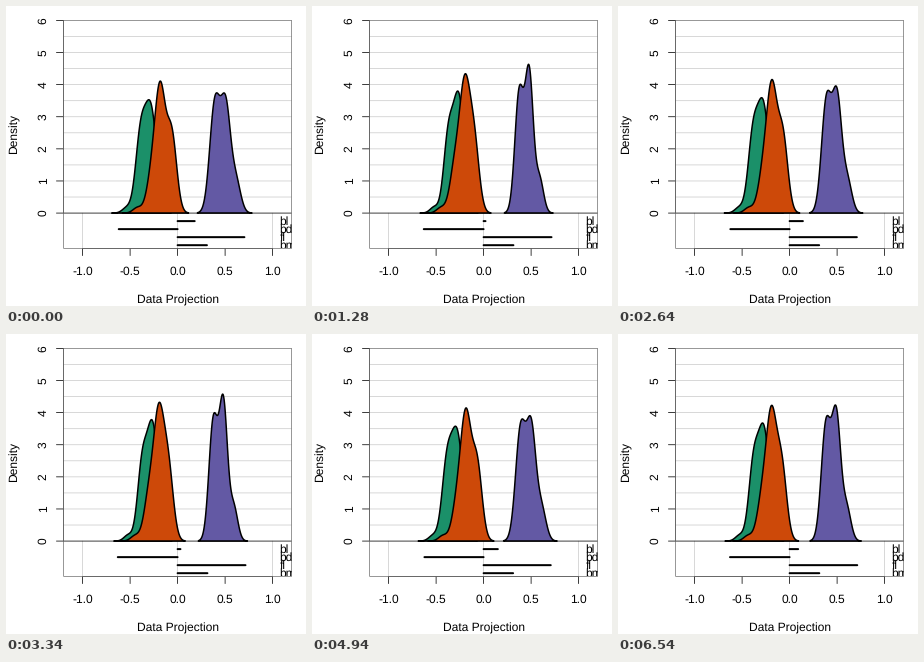
Recreate the animation shown at these times as a matplotlib script. Size 300 px wide and 300 px high, loop 6.56 s.

```python
import numpy as np
import matplotlib.pyplot as plt
from matplotlib.animation import FuncAnimation
from matplotlib.collections import LineCollection
from matplotlib.patches import Polygon, Rectangle

plt.rcParams.update({
    "font.family": "Liberation Sans", "font.size": 12,
    "path.snap": False, "text.hinting": "none",
})

SIZE, LOOP, TICK = 300, 6560, 20
L, R, T, B = 57.6, 285.6, 14.4, 242.4
REACH = 18                              # steps from rest to the widest rotation
MAX_SIN = 0.18                          # share of "bl" at the widest rotation
BEATS = np.cumsum([0, 100, 20, 100, 20, 100, 20])   # one 460 ms bar of uneven steps

# Each hill: colour, growth of its widths over the rotation, and its bumps as
# (centre, height, width, centre drift, height drift)
HILLS = [
    ("#1b9069", 0.07, [(-0.517, 0.19, 0.044, -0.016, -0.02),
                       (-0.371, 2.18, 0.049, -0.022, -0.03),
                       (-0.259, 3.64, 0.059, -0.023, -0.43)]),
    ("#cd4909", 0.0, [(-0.450, 0.17, 0.047, 0.028, 0.0),
                      (-0.306, 1.43, 0.053, 0.031, -0.43),
                      (-0.200, 3.80, 0.055, 0.018, -0.06),
                      (-0.103, 2.06, 0.052, 0.042, 0.31)]),
    ("#6359a4", 0.21, [(0.373, 3.77, 0.045, 0.020, -0.38),
                       (0.477, 4.42, 0.042, 0.030, -1.24),
                       (0.586, 1.06, 0.041, 0.029, -0.10)]),
]


def px(v):
    return (L + R) / 2 + v * (R - L) / 2.4


def py(v):
    return B - (v + 1.1) * (B - T) / 7.1


def outline(bumps, growth, u):
    """Sum of normal bumps, u of the way from rest to the widest rotation."""
    c, h, w, dc, dh = np.array(bumps).T
    c, h, w = c + u * dc, h + u * dh, w * (1 + u * growth)
    x = np.linspace(c[0] - 3.4 * w[0], c[-1] + 3.4 * w[-1], 140)
    y = (h * np.exp(-((x[:, None] - c) / w) ** 2 / 2)).sum(axis=1)
    y[[0, -1]] = 0
    return np.column_stack([px(x), py(y)])


def axis_values(u):
    """Projection weights: the first turns in, the others shrink to match."""
    s = u * MAX_SIN
    rest = np.sqrt(1 - s * s)
    return s, -0.63 * rest, 0.715 * rest, 0.314 * rest


fig = plt.figure(figsize=(SIZE / 72, SIZE / 72), dpi=72, facecolor="white")
ax = fig.add_axes([0, 0, 1, 1])
ax.set_xlim(0, SIZE)
ax.set_ylim(SIZE, 0)
ax.axis("off")


def strokes(segs, color, z, lw=0.75):
    art = LineCollection(segs, colors=color, linewidths=lw, zorder=z, capstyle="round")
    return ax.add_collection(art, autolim=False)


def label(x, y, s, **kw):
    return ax.text(x, y, s, va="baseline", rotation_mode="anchor", **kw)


grid = [[(L, py(v)), (R, py(v))] for v in np.arange(0.5, 6, 0.5)]
grid += [[(px(v), py(0)), (px(v), B)] for v in (-1, 0, 1)]
strokes(grid, "#cccccc", 1)

hills = [ax.add_patch(Polygon([(0, 0), (1, 1)], closed=True, fc=color, ec="black",
                              lw=1.5, joinstyle="round", zorder=2 + i))
         for i, (color, _, _) in enumerate(HILLS)]

strokes([[(L, py(0)), (R, py(0))]], "black", 6)
bars = strokes([], "black", 7, 2)

ticks = [[(L, py(0)), (L, py(6))], [(px(-1), B), (px(1), B)]]
for v in range(7):
    ticks.append([(L, py(v)), (L - 7.2, py(v))])
    label(40.6, py(v), str(v), ha="center", rotation=90)
for v in np.arange(-1, 1.1, 0.5):
    ticks.append([(px(v), B), (px(v), B + 7.2)])
    label(px(v), 268.8, f"{v:.1f}", ha="center")
strokes(ticks, "black", 8)

panel = Rectangle((L, T), R - L, B - T, fill=False, ec="#777777", lw=0.75, zorder=9)
ax.add_patch(panel)

label(px(0), 297.2, "Data Projection", ha="center")
label(11.8, (T + B) / 2, "Density", ha="center", rotation=90)
for i, name in enumerate(["bl", "bd", "fl", "bm"], 1):
    tag = label(273.4, py(-i / 4) + 3.4, name, zorder=10, clip_on=True)
    tag.set_clip_path(panel)


def draw(i):
    bar, t = divmod(i * TICK, 460)
    step = len(BEATS) * bar + np.searchsorted(BEATS, t, side="right") - 1
    u = abs(REACH - step % (2 * REACH)) / REACH
    for hill, (_, growth, bumps) in zip(hills, HILLS):
        hill.set_xy(outline(bumps, growth, u))
    bars.set_segments([[(px(0), py(-j / 4)), (px(v), py(-j / 4))]
                       for j, v in enumerate(axis_values(u), 1)])
    return [*hills, bars]


anim = FuncAnimation(fig, draw, frames=LOOP // TICK, interval=TICK,
                     repeat=True, repeat_delay=0)
plt.show()
```
